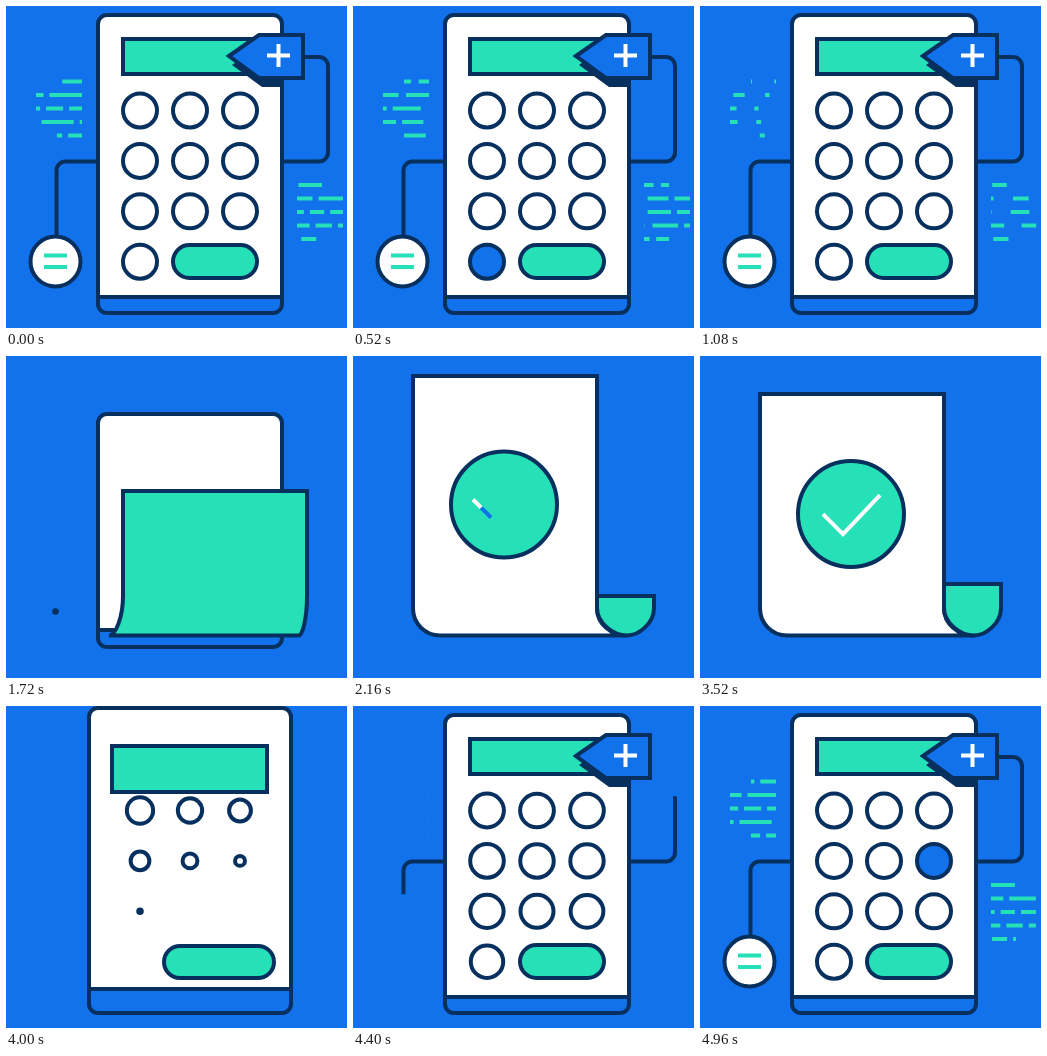
Recreate the animation shown at these times as an HTML page with a canvas. Size 341 px wide and 322 px high, loop 5000 ms.

```html
<!DOCTYPE html>
<html lang="en">
<head>
<meta charset="utf-8">
<title>Calculator to receipt</title>
<style>
html, body { margin: 0; width: 100%; height: 100%; overflow: hidden; background: #1272eb; }
canvas { display: block; width: 341px; height: 322px; }
</style>
</head>
<body>
<canvas id="stage"></canvas>
<script>
const W = 341, H = 322, LOOP = 5000;
const BLUE = '#1272eb', NAVY = '#07305f', GREEN = '#26e0b8', WHITE = '#fff';
const canvas = document.getElementById('stage');
const dpr = window.devicePixelRatio || 1;
canvas.width = W * dpr;
canvas.height = H * dpr;
const c = canvas.getContext('2d');

const clamp = x => Math.max(0, Math.min(1, x));
const span = (t, a, b) => clamp((t - a) / (b - a));
const smooth = x => (1 - Math.cos(Math.PI * x)) / 2;
const ease = (t, a, b) => smooth(span(t, a, b));
const backOut = x => 1 + 2.7 * (x - 1) ** 3 + 1.7 * (x - 1) ** 2;
const pop = (t, a, b) => backOut(span(t, a, b));
const shrink = (t, a, b) => backOut(1 - span(t, a, b));
const lerp = (a, b, k) => a + (b - a) * k;

// Eases through a list of poses, one per time.
function chain(t, times, poses) {
  let i = 0;
  while (i < times.length - 2 && t > times[i + 1]) i++;
  const k = ease(t, times[i], times[i + 1]);
  return poses[i].map((v, j) => lerp(v, poses[i + 1][j], k));
}

const OPEN = [1240, 1720, 2160];
const CLOSE = [3720, 4000, 4240];

// body: left, right, top, bottom, strip line, curl (0 case, 1 paper)
const CASE = [92, 276, 9, 307, 291, 0];
const SHUT = [92, 276, 58, 291, 274, 0];
const PAPER = [60, 244, 20, 279.5, 279.5, 1];
const SWELL = [83, 285, 2, 307, 283, 0];
// sheet: left, top, right, bend, bottom right, bottom left, bottom
const SHEETS = [
  [117, 33, 251, 68, 251, 117, 68],
  [117, 135, 301, 240, 293, 103, 279.5],
  [244, 240, 301, 252, 274, 274, 279.5]
];
// boxes: x, y, width, height, top radius, bottom radius
const PILLS = [
  [244, 228, 57, 51.5, 0, 28],
  [158, 240, 110, 32, 16, 16],
  [167, 239, 84, 33, 16.5, 16.5]
];
const SCREENS = [
  [98, 105, 106, 106, 53, 53],
  [106, 40, 155, 46, 0, 0],
  [117, 33, 134, 35, 0, 0]
];

function ink(fill, width = 4, color = NAVY) {
  if (fill) { c.fillStyle = fill; c.fill(); }
  if (width) { c.lineWidth = width; c.strokeStyle = color; c.stroke(); }
}

function disc(x, y, r, fill) {
  if (r <= 0.05) return;
  c.beginPath();
  c.arc(x, y, r, 0, 7);
  ink(r < 2 ? NAVY : fill, Math.min(4, r * 2));
}

function box([x, y, w, h, a, b]) {
  c.beginPath();
  c.roundRect(x, y, w, h, [a, a, b, b]);
  ink(GREEN);
}

function trace(points) {
  c.beginPath();
  points.forEach(([x, y], i) => i ? c.lineTo(x, y) : c.moveTo(x, y));
}

function scaled(x, y, s, draw) {
  if (s <= 0.01) return;
  c.save();
  c.translate(x, y);
  c.scale(s, s);
  c.translate(-x, -y);
  draw();
  c.restore();
}

function bodyPath([l, r, top, b, , curl]) {
  const rt = 9 * (1 - curl), rb = lerp(9, 27, curl), tail = lerp(-9, 30, curl);
  c.beginPath();
  c.moveTo(l + rt, top);
  c.arcTo(r, top, r, b, rt);
  c.lineTo(r, b - rb);
  c.bezierCurveTo(r, b - rb * 0.45, r + tail * 0.45, b, r + tail, b);
  c.arcTo(l, b, l, top, rb);
  c.arcTo(l, top, r, top, rt);
  c.closePath();
}

function body(p) {
  const [l, r, , b, strip] = p;
  bodyPath(p);
  ink(WHITE, 0);
  if (b - strip > 0.5) {
    c.save();
    c.clip();
    c.fillStyle = BLUE;
    c.fillRect(l, strip, r - l, b - strip);
    trace([[l, strip], [r, strip]]);
    ink();
    c.restore();
  }
  bodyPath(p);
  ink();
}

function sheet([l, top, r, bend, br, bl, b], drop) {
  const d = (b - bend) * 0.55;
  c.beginPath();
  c.moveTo(l, top - drop * 0.67);
  c.lineTo(r, top - drop * 0.67);
  c.lineTo(r, bend);
  c.bezierCurveTo(r, bend + d, lerp(br, r, 0.45), b, br, b);
  c.lineTo(bl, b);
  c.bezierCurveTo(lerp(bl, l, 0.45), b, l, bend + d, l, bend);
  c.closePath();
  ink(GREEN);
}

function checkPart(from, to, color) {
  if (to <= from) return;
  c.setLineDash([0, from, to - from, 200]);
  trace([[-28, 0], [-8, 20], [29, -19]]);
  ink(null, 4, color);
  c.setLineDash([]);
}

// A blue stroke leads the white one, then both draw back together.
function check(t, cy, drop) {
  const undo = 1 - ease(t, 3720, 3840);
  const lead = 84 * ease(t, 2020, 2400) * undo;
  const white = 84 * ease(t, 2060, 2480) * undo;
  const lift = 1 - drop / 18;
  c.save();
  c.translate(151 - 3 * lift, cy - 5 * lift);
  checkPart(white, lead, BLUE);
  checkPart(0, white, WHITE);
  c.restore();
}

// One key after another is pressed around the loop point.
function pressed(t, key) {
  const s = (t - 4880 + LOOP) % LOOP, n = Math.floor(s / 280);
  return n < 4 && s % 280 < 110 && key === (5 + 7 * n) % 10;
}

function keys(t) {
  for (let i = 0; i < 10; i++) {
    const age = t - 3838 - 25 * i, out = 1180 + 18 * i;
    const size = t > 3000 ? 1 - Math.exp(-Math.max(0, age) / 110) : shrink(t, out, out + 220);
    disc(134 + 50 * (i % 3), 104.5 + 50.4 * Math.floor(i / 3), 17 * size, pressed(t, i) ? BLUE : WHITE);
  }
}

// Wires grow out of the body and draw back into it.
function wire(points, length, shown) {
  if (shown <= 0) return;
  const end = points[points.length - 1];
  c.beginPath();
  c.moveTo(...points[0]);
  for (let i = 1; i < points.length - 1; i++) c.arcTo(...points[i], ...points[i + 1], 9);
  c.lineTo(...end);
  c.setLineDash([length * shown, 400]);
  ink();
  c.setLineDash([]);
}

function badge(size) {
  disc(49.5, 255.5, 25 * size, WHITE);
  if (size < 0.1) return;
  scaled(49.5, 255.5, size, () => {
    c.fillStyle = GREEN;
    c.fillRect(38, 247.5, 23, 4);
    c.fillRect(38, 259, 23, 4);
  });
}

function tag(size, p) {
  const shape = dx => {
    trace([[223, 50], [253, 29], [297, 29], [297, 72], [253, 72]].map(([x, y]) => [x + dx, y + 3 * dx]));
    c.closePath();
  };
  c.save();
  bodyPath(p);
  c.clip();
  scaled(272, 50, size, () => { shape(3); ink(NAVY, 0); });
  c.restore();
  scaled(272, 50, size, () => {
    shape(0);
    ink(BLUE);
    c.fillStyle = WHITE;
    c.fillRect(261, 47.5, 23, 4);
    c.fillRect(270.5, 38, 4, 23);
  });
}

let seed = 7;
const rnd = () => (seed = (seed * 16807) % 2147483647) / 2147483647;

// Dashes run outward from the case; later ones are shorter and sparser.
function stream(x, y, dir, speed, tail) {
  const rows = [];
  for (let i = 0; i < 5; i++) {
    const dashes = [];
    for (let u = 100; u > -1.1 * speed;) {
      const age = clamp(-u / speed);
      const len = lerp(14 + 20 * rnd(), tail * (0.7 + 0.6 * rnd()), age);
      dashes.push([u - len, u]);
      u -= len + lerp(6, 28, age);
    }
    rows.push({ y: y + 13.5 * i, reach: i % 4 ? 46 : 25, dashes });
  }
  return { x, dir, speed, rows };
}
const flows = [stream(76, 75.5, -1, 100, 3), stream(291, 179, 1, 80, 12)];

function code(t) {
  const s = (t > 2500 ? t - LOOP : t) / 1000;
  if (s < -0.6 || s > 1.6) return;
  c.fillStyle = GREEN;
  for (const { x, dir, speed, rows } of flows) {
    for (const { y, reach, dashes } of rows) {
      const head = Math.min(reach, speed * (s + 0.6));
      for (const [a, b] of dashes) {
        const u = Math.max(0, a + speed * s), v = Math.min(head, b + speed * s);
        if (v > u) c.fillRect(dir > 0 ? x + u : x - v, y - 2, v - u, 4);
      }
    }
  }
}

function draw(t) {
  const late = t > 3000;
  const drop = 18 * backOut(ease(t, 2200, 2720)) * (1 - ease(t, 3720, 4000));
  const p = late ? chain(t, CLOSE, [PAPER, SWELL, CASE]) : chain(t, OPEN, [CASE, SHUT, PAPER]);
  p[2] += drop;
  c.setTransform(dpr, 0, 0, dpr, 0, 0);
  c.fillStyle = BLUE;
  c.fillRect(0, 0, W, H);

  code(t);
  const shown = late ? ease(t, 4240, 4520) : 1 - ease(t, 1220, 1460);
  wire([[92, 155.5], [50.5, 155.5], [50.5, 230]], 114, shown);
  wire([[276, 155.5], [322, 155.5], [322, 51], [296, 51]], 174, shown);
  badge(late ? pop(t, 4440, 4800) : shrink(t, 1240, 1728));
  body(p);
  keys(t);

  if (t < CLOSE[0]) {
    scaled(209, 255.5, shrink(t, 1300, 1560), () => box(PILLS[2]));
    sheet(chain(t, OPEN, SHEETS), drop);
    const cy = 148.5 + drop * 0.53;
    disc(151, cy, 53 * pop(t, 1860, 2120), GREEN);
    check(t, cy, drop);
  } else {
    box(chain(t, CLOSE, PILLS));
    const screen = chain(t, CLOSE, SCREENS);
    box(screen);
    check(t, screen[1] + screen[3] / 2, 18);
  }
  tag(late ? pop(t, 4140, 4400) : shrink(t, 1180, 1420), p);
}

const start = performance.now();
function tick() {
  draw((performance.now() - start) % LOOP);
  requestAnimationFrame(tick);
}
tick();
</script>
</body>
</html>
```
